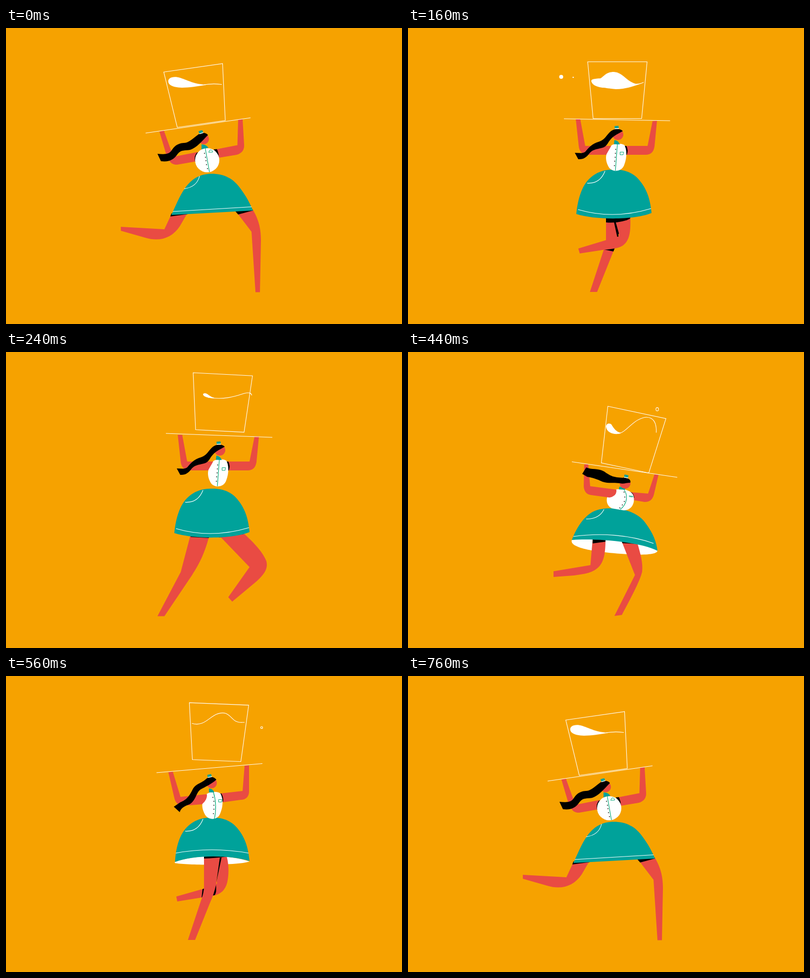
Animation, 800 px wide and 600 px high, one loop 0.8 s. Source, as an HTML page with a canvas:

```html
<!DOCTYPE html>
<html lang="en">
<head>
<meta charset="utf-8">
<title>Running waitress</title>
<style>
html, body { margin: 0; width: 100%; height: 100%; overflow: hidden; background: #f6a200; }
canvas { display: block; }
</style>
</head>
<body>
<canvas id="stage" width="800" height="600"></canvas>
<script>
const ctx = document.getElementById('stage').getContext('2d');
const LOOP = 800;
const BG = '#f6a200', RED = '#e94b43', TEAL = '#00a29a', WHITE = '#fff', BLACK = '#000', GREEN = '#00a877';

// Torsos: arms, blouse, head and hair
const leanBack = {
  armBehind: true,
  left: 'M310 210L319 208L333 247L344 260L386 251.5V270L346 277C333 278 328 268 323 254Z',
  right: 'M469 186L478 185L481 236C482 246 477 254 466 257L430 263L424 246L467.500 237.500Z',
  sleeves: 'M420 246L426 245.500Q430 253 430 263L424 266ZM387 251.500Q379 258 382 271L390 270Z',
  blouse: 'M382 268a24.500 24.500 0 1 0 49 0a24.500 24.500 0 1 0-49 0Z',
  seam: 'M402.500 243.500L411 292', pocket: 'M409.500 252L411.500 247.500Q417 246 417.500 251.500Z',
  dots: [401, 254, 403, 262, 404, 269, 405, 277, 407, 285],
  collar: 'M395 236Q404 235.500 409 243Q401 243.500 395 246Z',
  head: [399.5, 225, 10.5], hat: [393.5, 210.5, -18],
  hair: 'M408 217C404 211 394 211 387 217C374 227 368 233 359 233C345 234 340 240 334 249C328 257 318 256 306 255L313 270C330 272 339 267 347 255C354 246 362 249 372 247C385 243 396 229 408 217Z'
};
const upright = {
  armBehind: true,
  left: 'M339 185L348 185L358 239H412L405 257H363Q347 256 345 240Z',
  right: 'M494 189L503 188L498 240C496 252 490 257 480 257H440V239H484Z',
  sleeves: 'M435 239H441Q446 247 442 257L436 258Z',
  blouse: 'M411 238C416 234 430 233 437 237C442 245 443 262 437 277C432 293 411 293 405 281C400 272 399 262 401 256C404 250 408 244 411 238Z',
  seam: 'M423 235L419 289', pocket: 'M428.500 251.500H435.500L434.500 257H428.500Z',
  dots: [419.5, 246, 419, 254, 418.5, 262, 417.5, 270, 417, 279],
  collar: 'M417 227Q425 228 428 236L416 235.500Z',
  head: [424, 216, 11], hat: [421.5, 201, -4],
  hair: 'M434 209C428 203 417 204 410 209C400 218 398 226 387 230C370 235 365 243 358 251C352 255 345 253 337 253L344 266C352 266 358 265 365 256C372 246 380 246 392 243C403 240 403 232 410 225C416 218 425 214 434 209Z'
};
const leanFront = {
  left: 'M353 183L362 182L367 237L420 243.500Q422 250 415 257Q411 260 407 260L370 256Q354 254 354 240Z',
  right: 'M499 202L507 202L497 250C494 262 488 268 478 268L449 265L444 247L484 251Z',
  sleeves: 'M442 246L450 248.500Q452 256 450.500 265L444 266Z',
  blouse: 'M407 263.500a21.700 21.700 0 1 0 43.400 0a21.700 21.700 0 1 0-43.400 0Z',
  seam: 'M433 242.500Q445 264 424 286', pocket: 'M443.500 253.500L448.500 254V256H444Z',
  dots: [433.5, 248, 433.5, 257, 432, 266, 429, 274, 424.5, 280],
  collar: 'M429 234Q436 236 437.500 242.500L427 242Z',
  head: [436, 224, 11], hat: [435.5, 208.5, 2],
  hair: 'M447 220C443 212 434 211 426 214C410 221 402 216 390 219C378 227 380 232 366 231L339 235L343 251C356 244 364 249 374 243C386 232 394 234 408 234C425 228 434 224 447 220Z'
};
const crouch = {
  left: 'M356 228L364 227L368 272L421 279Q422 288 415 292Q411 295 407 295L370 290Q356 288 355 272Z',
  right: 'M498 248L506 249L497 288C494 300 488 304 478 304L454 300L448 284L485 287Z',
  sleeves: 'M445 283Q456 283 457 296L450 294Z',
  blouse: 'M418 279C432 276 450 279 455 290C460 305 452 321 436 321L412 317C401 312 400 300 403 292Z',
  seam: 'M436 278.500C445 290 443 308 429 319', pocket: 'M446.500 291.500L455 292.500M446.500 293L454 294',
  dots: [436.5, 284, 438, 294, 437, 303, 433, 310, 428, 316],
  collar: 'M427 273L437 274L439 279L426 278.500Z',
  head: [438.5, 266, 11], hat: [441, 251.5, 12],
  hair: 'M449 265C452 258 440 253 434 255C415 254 410 252 396 242C382 235 372 239 360 234L352 247L362 253C375 255 382 258 393 263C407 267 413 264 428 266C435 268 441 265 449 265Z'
};
const rising = {
  left: 'M328 195L337 194L352.500 245L406 239.500Q407 251 396 260L372 262H360Q344 264 340 247Z',
  right: 'M482 182L491 181V234C491 245 484 251 474 251L438 256L434 238L478 233Z',
  sleeves: 'M429 238L435 238Q440 246 438.500 255L432 257Z',
  blouse: 'M404 240C412 234 426 233 433 238C438 246 440 262 433 278C428 293 409 293 402 281C396 270 396 262 397 257Z',
  seam: 'M419 235.500Q427 261 421 290', pocket: 'M429.500 250.500H436L435.500 255.500H429.500Z',
  dots: [418, 246, 420, 254, 420, 262, 420, 270, 419, 279],
  collar: 'M410 228Q418 228 420.500 236H410Z',
  head: [415.5, 217, 10.5], hat: [411, 202, -12],
  hair: 'M425 210C420 204 412 203 405 208C395 218 384 217 377 230C369 247 362 252 352 256L339 265L351 276C353 268 360 264 371 260C384 252 384 236 393 230C402 225 417 218 425 210Z'
};

// Skirts
const dome = 'C343 345 352 320 365 307C380 292 395 287 416 287C440 287 455 294 467 308C482 326 489 345 492 375';
const skirts = {
  flat: {
    cloth: 'M334 379C343 360 350 342 360 327C375 305 392 295.500 416 295.500C440 295.500 460 305 474 326C486 342 493 356 499 370Z',
    hem: 'M337 372L496 362.500', fold: 'M360 326Q386 322 391 300'
  },
  full: { cloth: `M340 377${dome}C460 389 380 390 340 377Z`, hem: 'M343.500 368Q415 389 491 366', fold: 'M362 314.500Q388 316 398 290' },
  open: {
    under: 'M341 377C380 362 450 361 492 376C470 384 365 384 341 379Z',
    cloth: `M341.500 378${dome}C450 362.500 380 362.500 341.500 377Z`, hem: 'M343 359Q415 345.500 490 359', fold: 'M362 314.500Q388 316 398 290'
  },
  wide: {
    under: 'M372 373H466L468 386Q420 389 372 380Z',
    cloth: 'M338 374C345 348 355 325 365 316C380 300 395 296 415 296C440 296 460 305 470 317C485 336 496 352 502 382L466 379L420 375.500Z',
    hem: 'M342 365L498 372', fold: 'M364 321Q388 322 396 299'
  },
  flare: {
    under: 'M331 381C327 392 350 403 430 409C480 413 505 410 504 402C490 385 400 372 331 381Z',
    cloth: 'M331 381C343 350 360 328 380 321C395 316 410 316 425 318C450 321 470 332 480 347C495 367 502 385 504 403C470 385 380 377 331 381Z',
    hem: 'M334 374C390 366 450 371 496 388', fold: 'M360 338.500Q386 339 396 319'
  }
};

// Legs: layers from back to front
const legs = {
  leap: [
    [RED, 'M333 380L366 376L351 402C335 426 310 434 281 425L232 411V403L320 408Z'],
    [BLACK, 'M334 376L375 374L366 377.500L332 382Z'],
    [RED, 'M464 371L499 369C512 391 515 410 515 430L513 535.500H504L496 413Z'],
    [BLACK, 'M462 370L499 368.500V370L469 378Z']
  ],
  leapLong: [
    [RED, 'M337 375H374Q362 402 348 417C330 436 295 429 226.500 410.500L229 398L323 409.500Z'],
    [BLACK, 'M338 372L374 373V376H337Z'],
    [RED, 'M466 379L502 381C514 400 516 425 516 450C516 480 515 505 513 534H502L496 428Z'],
    [BLACK, 'M463 378L494 380L469 386Z']
  ],
  land: [
    [RED, 'M373 380H399C399 410 395 425 386 435C375 447 358 450 335 453L294 456V444.500L368.500 432Z'],
    [BLACK, 'M373 378H399V384.500L373 388Z'],
    [RED, 'M431 382L463 386C470 410 475 428 473 445C470 460 455 490 432 533L417 535L458.500 452Z'],
    [BLACK, 'M431 381L463 384L464 389L433 387.500Z']
  ],
  pass: [
    [RED, 'M396 448L418 445L382 535H367.500Z'],
    [BLACK, 'M396 449L418 445L415 453Z'],
    [RED, 'M400 383H449C450 410 449 430 434 441C425 447 410 448 396 449.500L347 457L344 447L400 430Z'],
    [BLACK, 'M400 383H449V386C440 392 418 396 400 394Z'],
    [BLACK, 'M416 393H419.500L426 416L425 423H422.500Z'],
    [BG, 'M425 417L426.500 419L425.500 423Z']
  ],
  passFront: [
    [RED, 'M434 366H446C451 385 450 405 447 418C443 434 434 442 420 445L346 457L344 447L400 431L425 420Z'],
    [BLACK, 'M397 432L404 429L402 440L395 449.500ZM424 422Q426 438 422 444L414 446Z'],
    [BG, 'M425 417L426.500 419L425 423Z'],
    [RED, 'M400 366H433L424 424Q420 443 412 460L382 535H367.500L394 455Q400 440 400 425Z'],
    [BLACK, 'M400 365Q424 361 446 366Q425 369 400 370ZM432 368H435.500L425 418Z']
  ],
  push: [
    [RED, 'M374 366L412 367C402 408 390 430 376 452L320 535.500H306L353 446Z'],
    [BLACK, 'M374 366H412L410 377L373 375Z'],
    [RED, 'M424 365L474 362C496 382 518 403 526 424C530 440 521 451 506 465L457 506L449 497L492 436Z'],
    [BLACK, 'M424 365L476 362L480 369L430 376Z']
  ]
};

// Drinks: filled splash, surface line, drops as [x, y, rx, ry, filled]
const drinks = {
  tail: {
    fill: 'M328 110C326 100 339 97 352 101C370 107 380 114 405 115C385 119 360 122 348 120.500C335 119 329 115 328 110Z',
    line: 'M400 115Q418 112 436 114.500', drops: []
  },
  swell: {
    fill: 'M371 110C368 103 376 103 389 102C396 98 400 89 416 89C434 90 441 108 460 113L469 113.500C455 118 440 124 420 124C405 123 400 121 393 121C380 119 373 115 371 110Z',
    line: 'M460 113.500Q469 114 476 110', drops: [[309.5, 99, 4, 4, 1], [333.7, 100, 1.3, 1.3, 1]]
  },
  thin: {
    fill: 'M402 104C403 100 409 101 413 105Q418 109 425 111C418 112 403 110 402 104Z',
    line: 'M412 110C445 116 470 107 485 102C497 99 500 102 500.500 106', drops: []
  },
  surge: {
    fill: 'M400 151C401 144 408 144 411 147C416 155 420 162 431 164C422 169 401 166 400 151Z',
    line: 'M425 165C437 165 452 143 466 137C485 127 503 132 501.500 163.500', drops: [[503.5, 116, 2.7, 3.4]]
  },
  wave: {
    line: 'M375.500 96C398 103 408 86 424 78C448 68 452 84 463 91C470 95 474 94 482 94', drops: [[516.5, 104.5, 2, 2]]
  }
};

// Each key pose holds until the next one; off = shifts of torso, skirt and drink
const poses = [
  { at: 0, torso: leanBack, skirt: 'flat', legs: 'leap', drink: 'tail', tray: [282, 213, 494, 182], glass: [394.5, 194.5, -8.2] },
  { at: 40, torso: leanBack, skirt: 'flare', legs: 'land', drink: 'tail', tray: [288, 249, 500, 218], glass: [400, 231, -8.2], off: [6, 36, 0, 0, 6, 36] },
  { at: 160, torso: upright, skirt: 'full', legs: 'pass', drink: 'swell', tray: [315, 184, 529.5, 188], glass: [423, 183.5, 0] },
  { at: 240, torso: upright, skirt: 'full', legs: 'push', drink: 'thin', tray: [323, 165, 538, 173], glass: [432, 160, 3], off: [8, -17, 0, -10, -4, -18] },
  { at: 360, torso: leanFront, skirt: 'wide', legs: 'leapLong', drink: 'thin', tray: [334, 179, 547, 206], glass: [441, 178, 7.2] },
  { at: 440, torso: crouch, skirt: 'flare', legs: 'land', drink: 'surge', tray: [331, 222.5, 544, 254], glass: [438.5, 235, 12] },
  { at: 560, torso: rising, skirt: 'open', legs: 'passFront', drink: 'wave', tray: [304, 196, 518, 177.5], glass: [425.5, 171.5, 2.4] },
  { at: 640, torso: rising, skirt: 'open', legs: 'push', drink: 'wave', tray: [296, 182, 510, 163], glass: [411, 162, -3], off: [-8, -14, 0, -10, -12, -9] },
  { at: 760, same: 0 }
];

function fill(d, color) {
  if (!d) return;
  ctx.fillStyle = color;
  ctx.fill(new Path2D(d));
}

function stroke(d, color, width = 1.1) {
  ctx.strokeStyle = color;
  ctx.lineWidth = width;
  ctx.stroke(new Path2D(d));
}

function ellipse(x, y, rx, ry, filled, color) {
  ctx.beginPath();
  ctx.ellipse(x, y, rx, ry, 0, 0, Math.PI * 2);
  ctx.fillStyle = ctx.strokeStyle = color;
  ctx.lineWidth = 1.1;
  filled ? ctx.fill() : ctx.stroke();
}

function shifted(x, y, draw) {
  ctx.save();
  ctx.translate(x, y);
  draw();
  ctx.restore();
}

function drawTorso(t) {
  if (t.armBehind) fill(t.left, RED);
  fill(t.right, RED);
  fill(t.sleeves, BLACK);
  fill(t.blouse, WHITE);
  stroke(t.seam, GREEN, 1.2);
  stroke(t.pocket, GREEN, 1);
  for (let i = 0; i < t.dots.length; i += 2) ellipse(t.dots[i], t.dots[i + 1], 0.9, 0.9, true, BLACK);
  if (!t.armBehind) fill(t.left, RED);
  fill(t.collar, TEAL);
  const [hx, hy, r] = t.head;
  ellipse(hx, hy, r, r, true, RED);
  fill(t.hair, BLACK);
  const [x, y, deg] = t.hat;
  shifted(x, y, () => {
    ctx.rotate(deg * Math.PI / 180);
    fill('M-4 -2.500H4V2.500H-4Z', TEAL);
    fill('M-4 2.300H4.500V3.800H-4Z', WHITE);
  });
}

function drawLower(pose, dx, dy) {
  const s = skirts[pose.skirt];
  shifted(dx, dy, () => fill(s.under, WHITE));
  legs[pose.legs].forEach(([color, d]) => fill(d, color));
  shifted(dx, dy, () => {
    fill(s.cloth, TEAL);
    stroke(s.hem, WHITE);
    stroke(s.fold, WHITE);
  });
}

function drawTray(pose, dx, dy) {
  const [x1, y1, x2, y2] = pose.tray;
  stroke(`M${x1} ${y1}L${x2} ${y2}`, WHITE);
  const [x, y, deg] = pose.glass;
  shifted(x, y, () => {
    ctx.rotate(deg * Math.PI / 180);
    stroke('M-60 -115H60L49 0H-49Z', WHITE);
  });
  const drink = drinks[pose.drink];
  shifted(dx, dy, () => {
    fill(drink.fill, WHITE);
    stroke(drink.line, WHITE);
    drink.drops.forEach(([px, py, rx, ry, full]) => ellipse(px, py, rx, ry, full, WHITE));
  });
}

function render(time) {
  let pose = poses.filter(p => p.at <= time).pop();
  if ('same' in pose) pose = poses[pose.same];
  const [tx, ty, sx, sy, dx, dy] = pose.off || [0, 0, 0, 0, 0, 0];
  ctx.fillStyle = BG;
  ctx.fillRect(0, 0, 800, 600);
  drawLower(pose, sx, sy);
  shifted(tx, ty, () => drawTorso(pose.torso));
  drawTray(pose, dx, dy);
}

const start = performance.now();
function tick() {
  render((performance.now() - start) % LOOP);
  requestAnimationFrame(tick);
}
tick();
</script>
</body>
</html>
```
